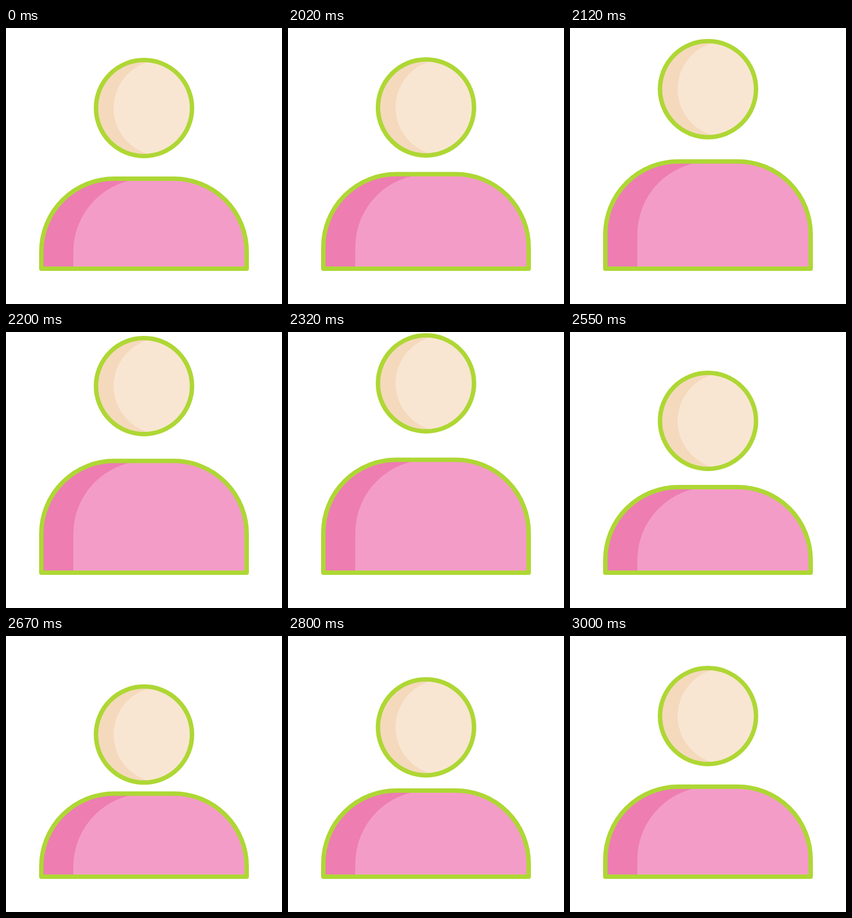
An HTML page that plays this animation: 500x500 px, repeating every 3020 ms.

```html
<!DOCTYPE html>
<html lang="en">
<head>
<meta charset="utf-8">
<title>Bouncing user icon</title>
<style>
  html, body { margin: 0; width: 100%; height: 100%; overflow: hidden; background: #fff; }
  svg { display: block; width: 100%; height: 100%; }
  .line { fill: none; stroke: #aed734; stroke-width: 8; stroke-linecap: round; }
  .skin { fill: #f8e6d2; }
  .skin-shade { fill: #f5d9bd; }
  .shirt { fill: #f49cc8; }
  .shirt-shade { fill: #ee7db2; }
</style>
</head>
<body>
<svg viewBox="0 0 500 500">
  <defs>
    <clipPath id="face"><circle cx="250" cy="145" r="87"/></clipPath>
    <clipPath id="above"><rect width="500" height="436"/></clipPath>
    <path id="torso" d="M64 600V405A132 132 0 0 1 196 273H304A132 132 0 0 1 436 405V600Z"/>
  </defs>

  <!-- The torso slides behind a fixed base line, so only its sides change length. -->
  <g clip-path="url(#above)">
    <g id="body">
      <use href="#torso" class="shirt-shade"/>
      <path class="shirt" d="M122 600V405A132 132 0 0 1 254 273H304A132 132 0 0 1 436 405V600Z"/>
      <use href="#torso" class="line"/>
    </g>
  </g>
  <path class="line" d="M64 436H436"/>

  <g id="head">
    <circle class="skin-shade" cx="250" cy="145" r="87"/>
    <circle class="skin" cx="282" cy="145" r="87" clip-path="url(#face)"/>
    <circle class="line" cx="250" cy="145" r="87"/>
  </g>
</svg>
<script>
  const LOOP = 3020, STEP = 25;

  function bezier(x1, y1, x2, y2) {
    const at = (a, b, s) => 3 * (1 - s) * (1 - s) * s * a + 3 * (1 - s) * s * s * b + s * s * s;
    return x => {
      let lo = 0, hi = 1;
      for (let i = 0; i < 24; i++) {
        const mid = (lo + hi) / 2;
        if (at(x1, x2, mid) < x) lo = mid; else hi = mid;
      }
      return at(y1, y2, (lo + hi) / 2);
    };
  }

  const smooth = p => p * p * (3 - 2 * p);

  // Each key: time in ms, vertical offset, easing towards it.
  const parts = [
    { node: document.getElementById("head"), keys: [
      [2000, 0],
      [2325, -52, bezier(.34, 0, .15, 1)],
      [2645, 34.3, smooth],
      [3000, 0, smooth]
    ] },
    { node: document.getElementById("body"), keys: [
      [2000, 0],
      [2300, -42.5, bezier(.25, .6, .5, 1)],
      [2610, 13.5, smooth],
      [3000, 0, smooth]
    ] }
  ];

  function offset(keys, t) {
    const i = keys.findIndex(key => t < key[0]);
    if (i < 1) return 0;
    const [t0, y0] = keys[i - 1], [t1, y1, ease] = keys[i];
    return y0 + (y1 - y0) * ease((t - t0) / (t1 - t0));
  }

  // Poses advance at 40 per second, on a clock of 10 ms ticks.
  function poseTime(t) {
    const tick = Math.floor(t / 10) * 10;
    return Math.floor((tick + 5) / STEP) * STEP;
  }

  const start = performance.now();

  function draw() {
    const t = poseTime((performance.now() - start) % LOOP);
    for (const { node, keys } of parts) {
      node.setAttribute("transform", `translate(0 ${offset(keys, t).toFixed(2)})`);
    }
    requestAnimationFrame(draw);
  }
  draw();
</script>
</body>
</html>
```
